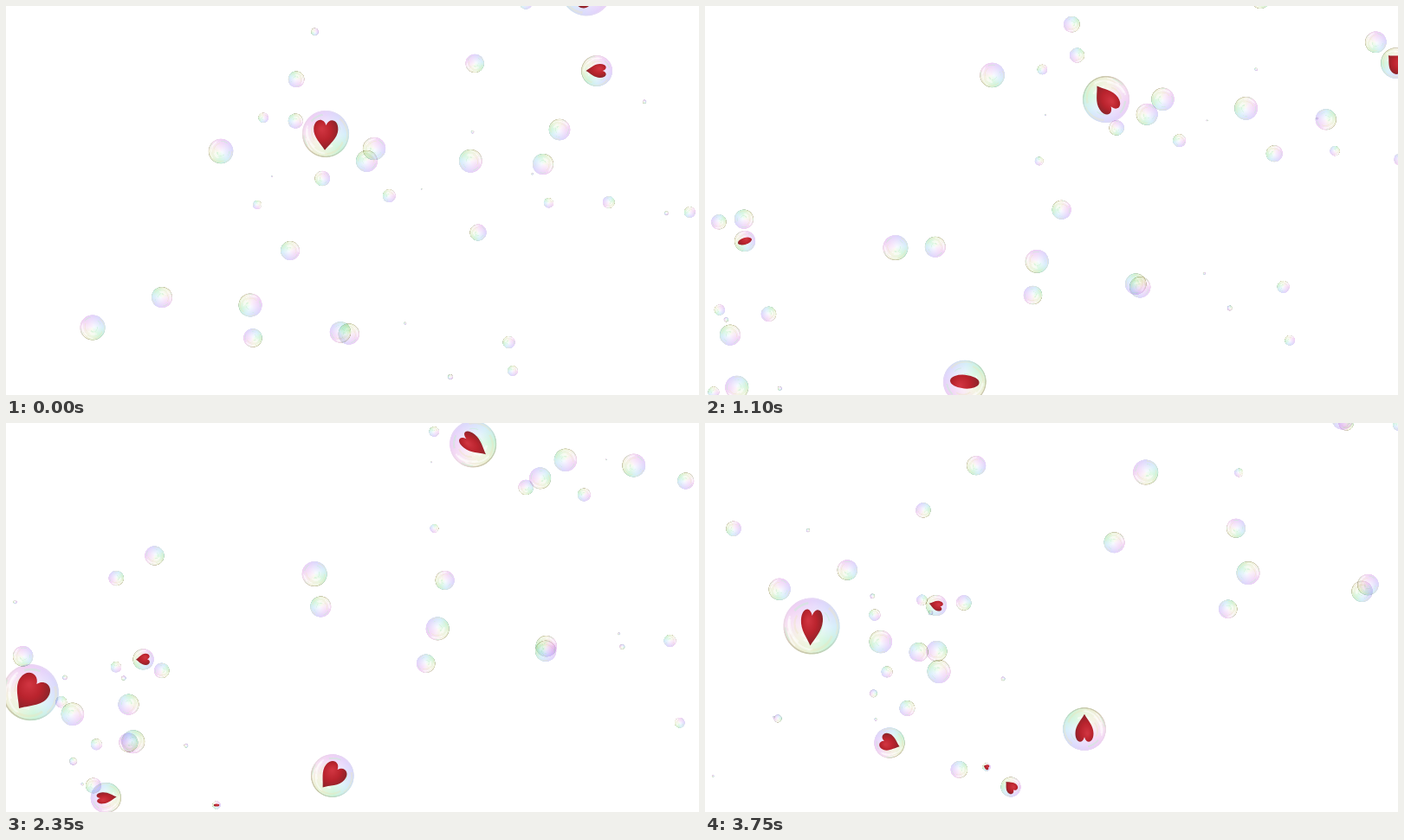
An HTML page with a canvas that plays this animation: 800 by 450 pixels, repeating every 3.8 s.

```html
<!DOCTYPE html>
<html lang="en">
<head>
<meta charset="utf-8">
<title>Drifting bubbles</title>
<style>
html, body { margin: 0; width: 100%; height: 100%; overflow: hidden; background: #fff; }
canvas { display: block; }
</style>
</head>
<body>
<canvas id="stage" width="800" height="450"></canvas>
<script>
const LOOP = 3800, STEP = 50, TAU = Math.PI * 2, RAD = Math.PI / 180;
const ctx = document.getElementById('stage').getContext('2d');
const bubbles = [], hearts = [];

let seed = 11;
function random(min, max) {
  seed = (seed * 16807) % 2147483647;
  return min + (max - min) * seed / 2147483647;
}

// A bubble drifts in a straight line from where it is at time zero.
function bubble(r, x, y, vx, vy) {
  bubbles.push({ r, x, y, vx, vy, turn: random(0, TAU), spin: random(-1.5, 1.5) });
}

// A heart bubble follows [seconds, x, y] keys, turns steadily and is edge on at one moment.
function heart(r, { turn, spin, edge, flip }, ...keys) {
  hearts.push({ r, turn, spin, edge, flip, keys });
}

function crowd(count, left, right, top, bottom) {
  for (let i = 0; i < count; i++) {
    const r = i % 5 < 2 ? random(1, 5) : random(6, 14);
    bubble(r, random(left, right), random(top, bottom), random(75, 105), random(-75, -45));
  }
}

heart(27.7, { turn: 3, spin: 130, edge: 1.85, flip: 1.15 }, [0, 369, 148], [1.1, 463, 108], [2.95, 574, -18]);
heart(18.5, { turn: 90, spin: 40, edge: -1, flip: .8 }, [0, 682, 75], [.45, 724, 75], [1.1, 798, 66]);
heart(30, { turn: 150, spin: 75, edge: -1.5, flip: 1 }, [0, 670, -18], [.45, 692, -9], [1.1, 740, -45]);
heart(12.6, { turn: 60, spin: 12, edge: 1.1, flip: .85 }, [.45, 0, 312], [1.1, 46, 272], [1.85, 118, 289], [3.75, 267, 211]);
heart(25.5, { turn: -195, spin: 100, edge: 1.1, flip: .9 }, [0, 225, 478], [.45, 252, 445], [1.85, 351, 424], [3.75, 438, 354]);
heart(33.3, { turn: 90, spin: -23, edge: 4.6, flip: .8 }, [1.1, -45, 340], [1.85, 8, 329], [2.95, 54, 285], [3.75, 123, 235]);
heart(18.2, { turn: 223, spin: 18, edge: 1.75, flip: 1 }, [1.1, 70, 480], [1.85, 107, 439], [2.95, 131, 426], [3.75, 213, 370]);
heart(5, { turn: 57, spin: 14, edge: 2.3, flip: 1.1 }, [2.35, 243, 442], [3.75, 325, 398]);
heart(12, { turn: 100, spin: 10, edge: 2.5, flip: 1 }, [2.95, 300, 470], [3.75, 353, 421]);

// The most prominent plain bubbles, then two loose crowds: on stage, and on the way in.
bubble(15, 100, 372, 109, -84);
bubble(14, 282, 346, 92, -46);
bubble(11.2, 285, 384, 85, -45);
bubble(12.5, 180, 337, 78, -53);
bubble(11.5, 328, 283, 76, -43);
bubble(13.7, 425, 165, 94, -52);
bubble(14.8, 248, 168, 76, -80);
bubble(12.6, 620, 183, 88, -47);
bubble(12.8, 639, 143, 123, -92);
bubble(10, 545, 262, 102, -83);
bubble(5.3, 290, 230, 87, -46);
bubble(6.2, 585, 422, 82, -32);
bubble(12.5, -70, 429, 90, -44);
bubble(14, -60, 505, 88, -58);
bubble(9.2, -20, 418, 85, -56);
crowd(22, 280, 800, -10, 240);
crowd(5, 380, 600, 310, 430);
crowd(22, -330, -15, 280, 620);

// Smooth curve through the keys, carried straight on at both ends.
function at(keys, t) {
  const last = keys.length - 1;
  const slope = (a, b, k) => (keys[b][k] - keys[a][k]) / (keys[b][0] - keys[a][0]);
  let i = 0;
  while (i < last - 1 && t > keys[i + 1][0]) i++;
  const [a, b] = [keys[i], keys[i + 1]];
  const span = b[0] - a[0], u = (t - a[0]) / span, v = 1 - u;
  return [1, 2].map(k => {
    const direct = slope(i, i + 1, k);
    if (u < 0 || u > 1) return a[k] + direct * span * u;
    const m0 = i ? slope(i - 1, i + 1, k) : direct;
    const m1 = i + 1 < last ? slope(i, i + 2, k) : direct;
    return a[k] * (1 + 2 * u) * v * v + b[k] * u * u * (3 - 2 * u) + span * u * v * (m0 * v - m1 * u);
  });
}

function conic(c, ...colours) {
  const g = c.createConicGradient(-Math.PI / 2, 0, 0);
  [...colours, colours[0]].forEach((colour, i) => g.addColorStop(i / colours.length, colour));
  return g;
}

// The soap film, drawn once and then stamped at every size.
function makeFilm(size) {
  const film = document.createElement('canvas');
  film.width = film.height = size;
  const c = film.getContext('2d');
  c.translate(size / 2, size / 2);
  c.scale(size / 2, size / 2);
  c.beginPath();
  c.arc(0, 0, .98, 0, TAU);
  c.clip();
  c.fillStyle = conic(c, '#e0cdfa', '#d2d6fc', '#cbeaf8', '#c2f2d2', '#e4f2d4', '#f0ecd6', '#f5dcf0', '#eecaf4');
  c.fillRect(-1, -1, 2, 2);
  const glow = c.createRadialGradient(.1, -.05, 0, 0, 0, 1);
  glow.addColorStop(0, 'rgba(255,255,255,.85)');
  glow.addColorStop(.55, 'rgba(255,255,255,.4)');
  glow.addColorStop(1, 'rgba(255,255,255,.05)');
  c.fillStyle = glow;
  c.fillRect(-1, -1, 2, 2);
  // Swirls
  for (let i = 0; i < 16; i++) {
    const start = random(0, TAU);
    c.beginPath();
    c.arc(random(-.1, .1), random(-.1, .1), random(.25, .9), start, start + random(.4, 1.3));
    c.lineWidth = random(.03, .12);
    c.strokeStyle = ['rgba(255,255,255,.5)', 'rgba(190,240,205,.45)', 'rgba(236,228,190,.4)'][i % 3];
    c.stroke();
  }
  c.beginPath();
  c.arc(0, 0, .95, 0, TAU);
  c.lineWidth = .05;
  c.strokeStyle = conic(c, '#e6d8f6', '#d8dcf5', '#cfe4ea', '#bcd8c3', '#c8c9ac', '#cfc8b4', '#ecdae4', '#ecd2f2');
  c.stroke();
  return film;
}
const film = makeFilm(128);

function drawFilm(x, y, r, turn) {
  ctx.save();
  ctx.globalCompositeOperation = 'multiply';
  ctx.translate(x, y);
  ctx.rotate(turn);
  ctx.drawImage(film, -r, -r, 2 * r, 2 * r);
  if (r < 5) {
    ctx.beginPath();
    ctx.arc(0, 0, Math.max(r - .5, .5), 0, TAU);
    ctx.strokeStyle = 'rgba(130,130,145,.18)';
    ctx.lineWidth = .8;
    ctx.stroke();
  }
  ctx.restore();
}

const heartShape = new Path2D('M0 .68C-.2 .42-.6 .16-.6-.2C-.6-.64-.13-.7 0-.36C.13-.7 .6-.64 .6-.2C.6 .16 .2 .42 0 .68Z');
const red = ctx.createRadialGradient(-.2, -.2, .05, -.08, -.05, .75);
red.addColorStop(0, '#cf3440');
red.addColorStop(.5, '#b9232d');
red.addColorStop(1, '#87242a');

function drawHeart(x, y, r, turn, wide) {
  ctx.save();
  ctx.translate(x, y);
  ctx.rotate(turn);
  ctx.scale(r, r);
  ctx.fillStyle = red;
  if (wide < .4) {
    // Edge on, the puffy heart looks like a lens.
    ctx.beginPath();
    ctx.ellipse(0, 0, .31, .66, 0, 0, TAU);
    ctx.fill();
  } else {
    ctx.scale(Math.max(wide, .6), 1);
    ctx.fill(heartShape);
  }
  ctx.restore();
}

function draw(t) {
  ctx.fillStyle = '#fff';
  ctx.fillRect(0, 0, 800, 450);
  for (const b of bubbles) drawFilm(b.x + b.vx * t, b.y + b.vy * t, b.r, b.turn + b.spin * t);
  for (const h of hearts) {
    const [x, y] = at(h.keys, t);
    const turn = (h.turn + h.spin * t) * RAD;
    drawFilm(x, y, h.r, turn);
    drawHeart(x, y, h.r, turn, Math.abs(Math.sin(h.flip * (t - h.edge))));
  }
}

function tick() {
  const ms = performance.now() % LOOP;
  draw(Math.floor(ms / STEP) * STEP / 1000);
  requestAnimationFrame(tick);
}
tick();
</script>
</body>
</html>
```
